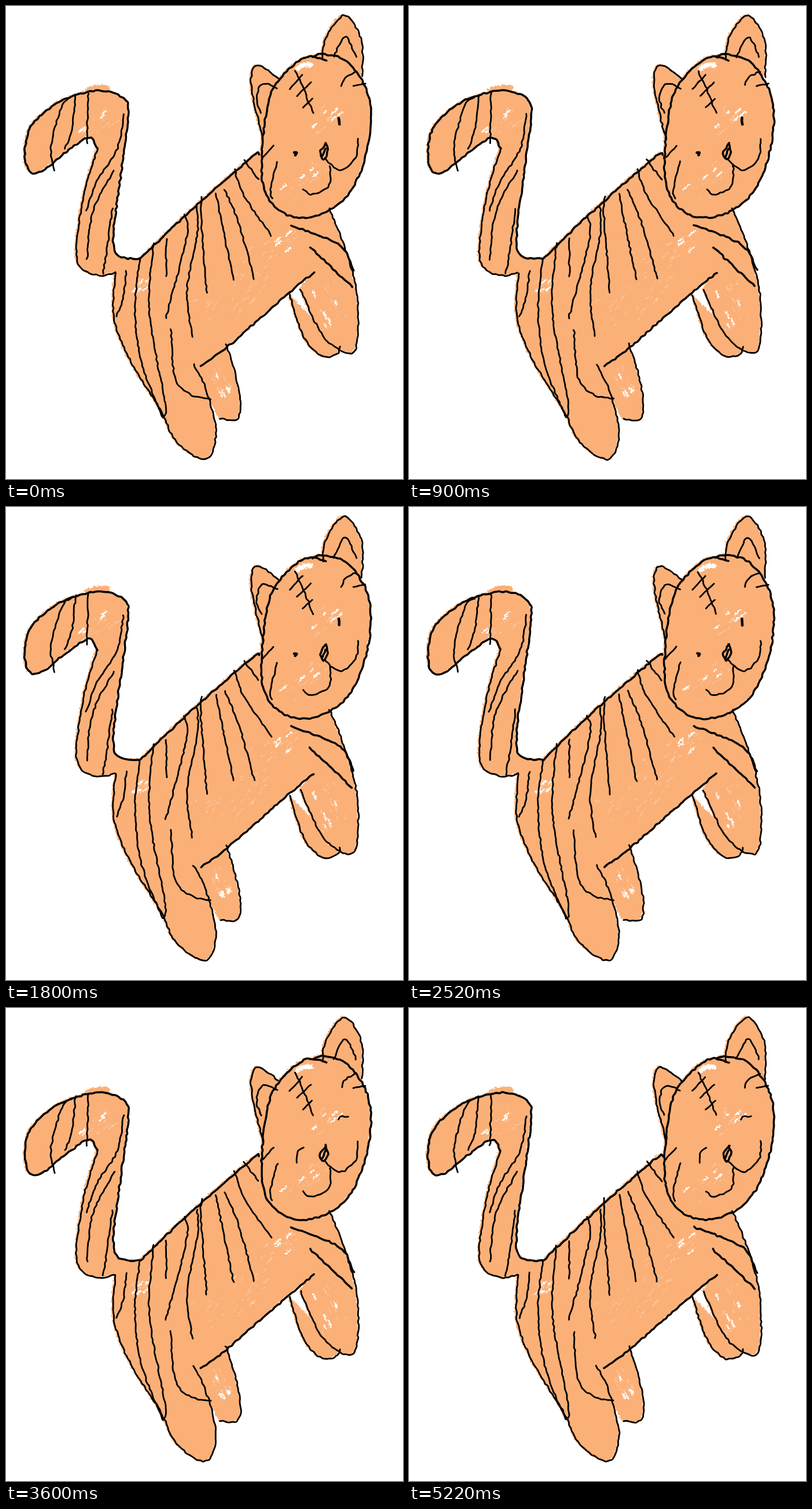
An HTML page that plays this animation: 686x816 px, repeating every 5400 ms.

```html
<!DOCTYPE html>
<html lang="en">
<head>
<meta charset="utf-8">
<title>Toy tiger</title>
<style>
  html, body { margin: 0; width: 100%; height: 100%; overflow: hidden; background: #fff; }
  svg { display: block; width: 686px; height: 816px; }
  path { stroke-linecap: round; stroke-linejoin: round; }
  #crayon { fill: #fbb077; stroke: #fbb077; stroke-width: 2; filter: url(#grain); }
  #gaps { fill: none; stroke: #fff; }
  #ink { fill: none; stroke: #000; stroke-width: 2.8; }
  #ink .bold { stroke-width: 3.5; }
</style>
</head>
<body>
<svg viewBox="0 0 686 816">
  <filter id="grain" filterUnits="userSpaceOnUse" x="0" y="0" width="686" height="816" color-interpolation-filters="sRGB">
    <feTurbulence id="noise" type="fractalNoise" baseFrequency=".3" numOctaves="2"/>
    <feDisplacementMap in="SourceGraphic" scale="7" xChannelSelector="R" yChannelSelector="G"/>
  </filter>

  <!-- each shape joins ink lines; a minus runs a line backwards -->
  <g id="crayon" transform="translate(-2 -1)">
    <path data-shape="farHind -haunch"/>
    <path data-shape="farFront"/>
    <path data-shape="tail -under"/>
    <path data-shape="back chest -belly -haunch"/>
    <path data-shape="earRight"/>
    <path data-shape="earLeft"/>
    <path data-shape="head"/>
    <path d="M142 148Q160 139 177 143" stroke-width="10"/>
    <g id="gaps"><path d="M506 109q10-9 23-6" stroke-width="8"/></g>
  </g>

  <!-- key points of each line; a semicolon lifts the pen -->
  <g id="ink">
    <path class="bold" id="tail" data-p="158,246 143,227 104,252 60,286 38,282 33,245 46,204 95,164 160,146 204,160 211,192 200,280 186,390 193,430 232,436"/>
    <path id="under" data-p="158,246 136,320 122,410 128,450 160,465 188,460"/>
    <path data-p="113,157 97,172 78,240 84,284; 120,153 114,212 102,246; 142,150 140,237; 203,186 192,247 157,303 139,353; 187,283 150,355 140,437; 184,349 173,430 167,462"/>

    <path class="bold" id="back" data-p="232,436 320,352 425,261 438,256"/>
    <path class="bold" id="belly" data-p="337,621 380,590 480,503 532,460"/>
    <path id="haunch" data-p="189,461 187,540 215,613 266,695 295,752 345,782 363,735 345,660 324,618"/>
    <path id="farHind" data-p="380,583 395,630 405,680 400,712 370,712"/>
    <path id="chest" data-p="559,350 585,415 606,495 606,585 584,597 545,565 509,489"/>
    <path id="farFront" data-p="490,498 514,570 545,604 572,600 577,588"/>
    <path data-p="285,558 292,640 318,670 354,678; 208,457 203,500 191,535"/>
    <path data-p="231,438 223,520 234,615 270,708; 255,409 248,530 275,685 271,710; 277,402 277,466"/>
    <path data-p="308,360 312,400 276,538; 330,347 331,390 313,490 322,570; 338,328 337,365 347,495"/>
    <path data-p="363,323 373,375 393,472; 378,317 402,375 429,471; 395,282 410,325 458,396; 411,265 436,299"/>
    <path class="bold" data-p="492,378 575,412 601,456; 525,416 598,484"/>

    <path class="bold" id="head" data-p="530,88 548,83 590,97 624,148 630,210 615,280 585,333 535,362 485,360 448,322 442,255 455,160 483,115 520,88 553,94"/>
    <path id="earRight" data-p="547,93 553,55 585,16 614,58 615,122"/>
    <path id="earLeft" data-p="471,125 433,102 424,140 444,230"/>
    <path data-p="566,88 586,53 605,88; 469,142 443,134 433,160 441,185"/>
    <path data-p="500,112 512,138 531,185; 490,143 512,119; 503,155 527,132; 513,175 529,160"/>
    <path data-p="580,137 586,124 606,113; 600,138 621,134; 462,241 443,262; 469,268 457,315 460,332"/>
    <path class="bold" data-p="553,237 543,253 549,265 556,252 553,237; 552,246 547,259"/>
    <path data-p="550,263 577,283 604,262 608,230; 560,276 558,310 528,325 514,316"/>
    <path id="open" stroke-width="4.5" data-p="575,193 576,204; 498,253 502,253 500,257"/>
    <path id="shut" data-p="574,192 579,186 584,188 591,187; 514,241 504,248 502,267"/>
  </g>
</svg>
<script>
const STEP = 180, COUNT = 30, SPACING = 5.5, WOBBLE = 1.1;
const $ = id => document.getElementById(id);
const newPath = () => document.createElementNS('http://www.w3.org/2000/svg', 'path');

function random(seed) {
  let s = seed >>> 0;
  return () => {
    s = (s + 0x6d2b79f5) >>> 0;
    let t = Math.imul(s ^ (s >>> 15), 1 | s);
    t = (t + Math.imul(t ^ (t >>> 7), 61 | t)) ^ t;
    return ((t ^ (t >>> 14)) >>> 0) / 4294967296;
  };
}

// Catmull-Rom spline through the points
function spline(p) {
  const at = i => p[Math.max(0, Math.min(p.length - 1, i))];
  let d = `M${p[0]}`;
  for (let i = 0; i < p.length - 1; i++) {
    const [a, b, c, e] = [at(i - 1), at(i), at(i + 1), at(i + 2)];
    const near = b.map((v, k) => v + (c[k] - a[k]) / 6);
    const far = c.map((v, k) => v - (e[k] - b[k]) / 6);
    d += `C${near} ${far} ${c}`;
  }
  return d;
}

// Evenly spaced dots along a smooth line
const probe = newPath();
function sample(text) {
  const keys = text.trim().split(' ').map(s => s.split(',').map(Number));
  probe.setAttribute('d', spline(keys));
  const total = probe.getTotalLength(), n = Math.max(2, Math.round(total / SPACING));
  return Array.from({ length: n + 1 }, (_, i) => {
    const { x, y } = probe.getPointAtLength(total * i / n);
    return [x, y];
  });
}

const lines = [...document.querySelectorAll('#ink path')].map(el =>
  ({ el, strokes: el.dataset.p.split(';').map(sample) }));

for (const el of document.querySelectorAll('[data-shape]')) {
  const dots = el.dataset.shape.split(' ').flatMap(name => {
    const [line] = lines.find(l => l.el.id === name.replace('-', '')).strokes;
    return name[0] === '-' ? [...line].reverse() : line;
  });
  el.setAttribute('d', `M${dots.join('L')}Z`);
}

// Bare paper showing through: short marks strewn along a direction
const rnd = random(7);
function scratch(x, y, reach, angle, count, width, opacity) {
  const c = Math.cos(angle), s = Math.sin(angle);
  let d = '';
  for (let i = 0; i < count; i++) {
    const u = (rnd() - .5) * 2 * reach, v = (rnd() - .5) * reach, len = 4 + rnd() * 8;
    d += `M${x + u * c - v * s} ${y + u * s + v * c}l${len * c} ${len * s}`;
  }
  const el = newPath();
  el.setAttribute('d', d);
  el.setAttribute('stroke-width', width);
  el.setAttribute('opacity', opacity);
  $('gaps').append(el);
}

const patches = [[520, 305, 42, -.7], [548, 195, 30, -.7], [558, 515, 50, 1.2],
                 [470, 415, 36, -.7], [370, 645, 24, 1.1], [160, 210, 36, -.7],
                 [235, 480, 26, -.7], [400, 490, 75, -.75]];
patches.forEach(([x, y, reach, angle], i) => {
  const belly = i === patches.length - 1;
  if (!belly) scratch(x, y, reach, angle, 5, 3, 1);
  scratch(x, y, reach, angle, belly ? 45 : 14, .8, .55);
});

function draw(step) {
  const r = random(step * 977 + 5);
  for (const { el, strokes } of lines) {
    el.setAttribute('d', strokes.map(dots => {
      const size = dots.length < 8 ? WOBBLE / 2 : WOBBLE;
      const shake = v => v + (r() - .5) * 2 * size;
      return spline(dots.map(dot => dot.map(shake)));
    }).join(''));
  }
  $('noise').setAttribute('seed', step + 1);
  const asleep = step >= COUNT / 2;
  $('open').style.display = asleep ? 'none' : '';
  $('shut').style.display = asleep ? '' : 'none';
}

let last = -1;
function tick() {
  const step = Math.floor(performance.now() / STEP) % COUNT;
  if (step !== last) draw(last = step);
  requestAnimationFrame(tick);
}
tick();
</script>
</body>
</html>
```
